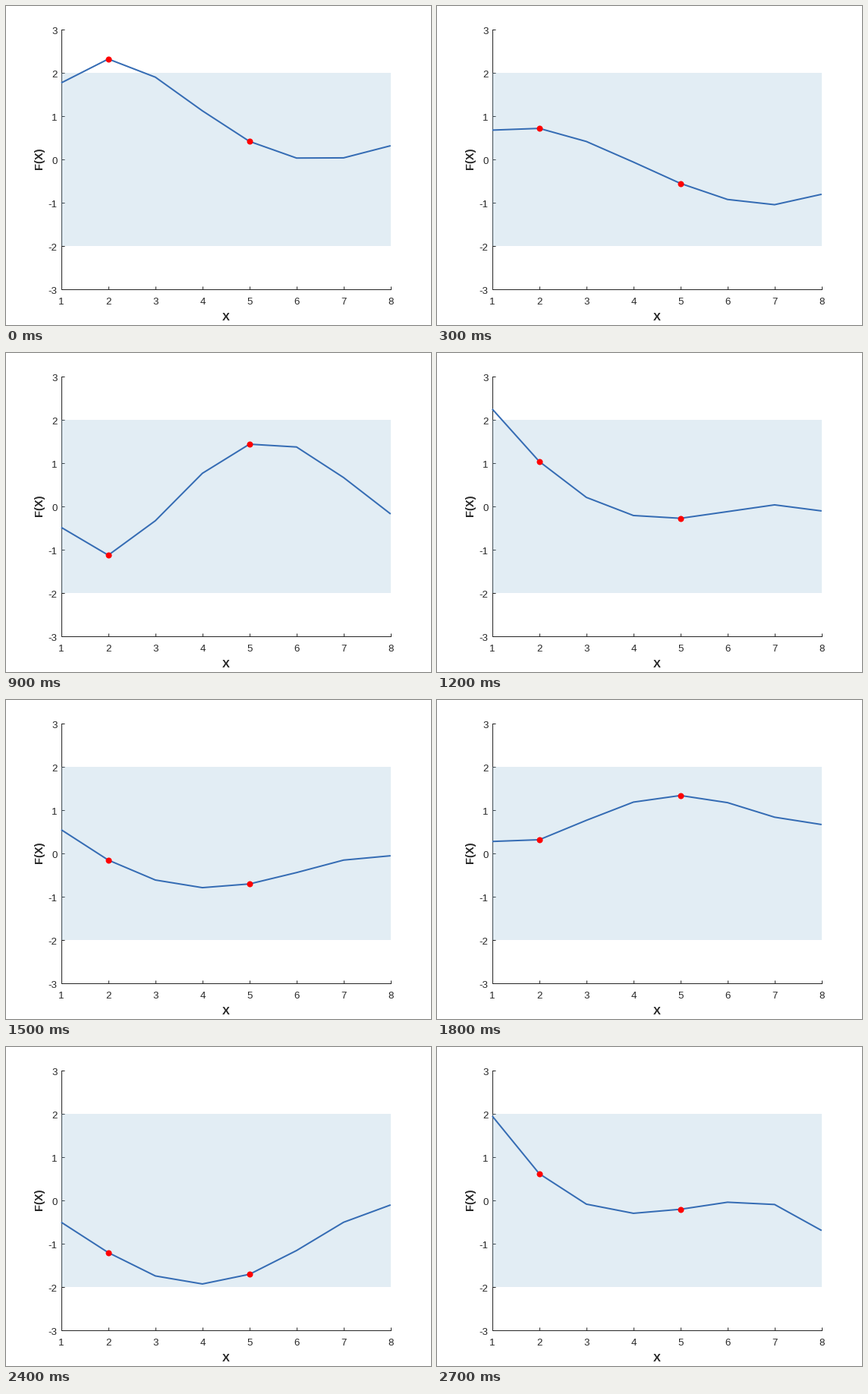
These frames come from a looping animation (560 by 420 pixels, 3000 ms). A matplotlib script:

```python
import matplotlib.pyplot as plt
import numpy as np
from matplotlib.animation import FuncAnimation

WIDTH, HEIGHT, DPI = 560, 420, 100
PX = 72 / DPI  # points per pixel
LEFT, RIGHT, TOP, BOTTOM = 72.8, 506.8, 31.0, 373.45
INK = "#262626"
LINE = "#356CB4"
BAND = "#8FBBD7"
FRAME_MS = 300

plt.rcParams["font.family"] = "Liberation Sans"

X = np.arange(1, 9)
MARKED = np.array([2, 5])

# Each random function is the quartic through five heights at KEY_X
KEY_X = (1, 2, 5, 7, 8)
KEY_HEIGHTS = [
    (1.77, 2.32, 0.42, 0.04, 0.32),
    (0.68, 0.72, -0.55, -1.04, -0.80),
    (-0.45, -0.49, -1.47, -2.09, -1.60),
    (-0.48, -1.12, 1.44, 0.67, -0.17),
    (2.25, 1.04, -0.27, 0.04, -0.10),
    (0.55, -0.15, -0.70, -0.15, -0.05),
    (0.28, 0.32, 1.34, 0.84, 0.67),
    (1.97, 1.80, -0.05, -1.29, -1.65),
    (-0.50, -1.20, -1.70, -0.50, -0.10),
    (1.95, 0.62, -0.20, -0.09, -0.69),
]

fig = plt.figure(figsize=(WIDTH / DPI, HEIGHT / DPI), dpi=DPI, facecolor="white")
ax = fig.add_axes([LEFT / WIDTH, 1 - BOTTOM / HEIGHT,
                   (RIGHT - LEFT) / WIDTH, (BOTTOM - TOP) / HEIGHT])
ax.set(xlim=(1, 8), ylim=(-3, 3), xticks=X, yticks=range(-3, 4))
ax.set_axisbelow(True)
ax.tick_params(direction="in", length=4 * PX, width=PX, color=INK,
               labelleft=False, labelbottom=False)
ax.spines[["top", "right"]].set_visible(False)
for side in ("left", "bottom"):
    ax.spines[side].set(linewidth=PX, color=INK, zorder=0.6)


def label(x, y, text, size=13.3, **style):
    """Place text with its baseline at a pixel position from the top left."""
    fig.text(x / WIDTH, 1 - y / HEIGHT, text, fontsize=size * PX, color=INK,
             va="baseline", **style)


for x in X:
    label(73 + 62 * (x - 1), 393, str(x), ha="center")
for y in range(-3, 4):
    label(67.5, 208.3 - 57.05 * y, str(y), ha="right")
label(290, 414, "X", 14.7, ha="center", weight="bold")
label(48, 201, "F(X)", 14.7, ha="center", weight="bold",
      rotation=90, rotation_mode="anchor")

ax.fill_between([1, 8], -2, 2, color=BAND, alpha=0.25, linewidth=0, zorder=1)
curve, = ax.plot([], [], color=LINE, linewidth=2 * PX, clip_on=False,
                 solid_capstyle="butt", zorder=3)
dots, = ax.plot([], [], "o", color="red", markersize=8 * PX,
                markeredgewidth=0, snap=False, zorder=4)


def draw(step):
    quartic = np.polyfit(KEY_X, KEY_HEIGHTS[step], 4)
    curve.set_data(X, np.polyval(quartic, X))
    dots.set_data(MARKED, np.polyval(quartic, MARKED))
    return curve, dots


anim = FuncAnimation(fig, draw, frames=len(KEY_HEIGHTS), interval=FRAME_MS,
                     repeat=True, repeat_delay=0)
plt.show()
```
